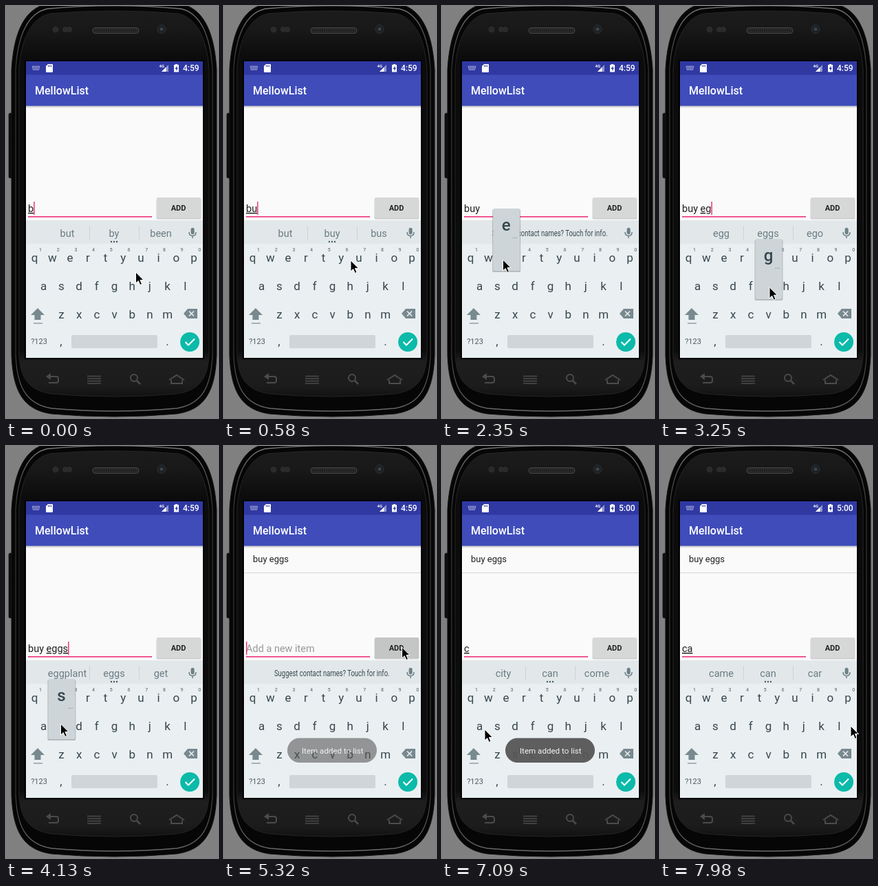
An HTML page for the animation above (8000 ms loop, 308 by 596 pixels).

```html
<!DOCTYPE html>
<html lang="en">
<head>
<meta charset="utf-8">
<title>Todo app on a phone</title>
<style>
html, body { margin: 0; width: 100%; height: 100%; overflow: hidden; background: #808080; }
svg { display: block; width: 308px; height: 596px; }
text { font-family: Roboto, sans-serif; white-space: pre; }
.mid { text-anchor: middle; }
.key { font-size: 17px; fill: #37474f; }
.digit { font-size: 7px; font-weight: 500; fill: #6b7b82; }
.hint { font-size: 14.5px; fill: #6b7b82; }
</style>
</head>
<body>
<svg viewBox="0 0 308 596">
  <defs>
    <linearGradient id="face" x2="0" y2="1">
      <stop offset="0" stop-color="#1c1c1c"/><stop offset=".05" stop-color="#181818"/>
      <stop offset=".12" stop-color="#0c0c0c"/><stop offset=".88" stop-color="#0c0c0c"/>
      <stop offset=".91" stop-color="#1e1e1e"/><stop offset=".97" stop-color="#1c1c1c"/>
      <stop offset="1" stop-color="#121212"/>
    </linearGradient>
    <linearGradient id="rim" x2="0" y2="1">
      <stop offset="0" stop-color="#777"/><stop offset=".15" stop-color="#333"/>
      <stop offset=".85" stop-color="#333"/><stop offset="1" stop-color="#6a6a6a"/>
    </linearGradient>
    <linearGradient id="drop" x2="0" y2="1">
      <stop offset="0" stop-opacity=".25"/><stop offset="1" stop-opacity="0"/>
    </linearGradient>
    <pattern id="mesh" width="3" height="3" patternUnits="userSpaceOnUse">
      <path fill="#1b1b1b" d="M0 0h3v3H0z"/><path fill="#4a4a4a" d="M0 0h1v1H0zM1.5 1.5h1v1h-1z"/>
    </pattern>
  </defs>

  <!-- phone -->
  <rect width="308" height="596" fill="#808080"/>
  <rect x="4" y="155" width="7" height="94" rx="2" fill="#0c0c0c" stroke="#222" stroke-width=".7"/>
  <path fill="#060606" stroke="#151515" d="M56-2C26 6 11 40 8 92V505C10 556 24 584 66 590Q157 598 248 590C290 584 304 556 306 505V92C303 40 288 6 258-2Z"/>
  <path fill="none" stroke="url(#rim)" stroke-width="1.300" d="M60 4C32 10 17 42 14 92V505C16 552 30 576 66 582Q157 590 248 582C284 576 298 552 300 505V92C297 42 282 10 254 4Q157-5 60 4Z"/>
  <path fill="url(#face)" stroke="#242424" d="M64 11C38 16 22 46 19 92V505C21 540 34 556 66 561Q157 569 248 561C280 556 293 540 295 505V92C292 46 276 16 250 11Q157 3 64 11Z"/>
  <rect x="126" y="31.500" width="67" height="8" rx="4" fill="url(#mesh)" stroke="#4a4a4a"/>
  <g fill="#2b2b2b"><circle cx="72" cy="34" r="4.500"/><circle cx="86" cy="34" r="4"/><circle cx="92" cy="34" r="4"/></g>
  <circle cx="226" cy="33.500" r="6" fill="#1c2023" stroke="#303336"/><circle cx="226" cy="33.500" r="2.500" fill="#38444c"/>
  <g fill="none" stroke="#4b4b4b" stroke-width="2">
    <path d="M64 536H73Q76 536 76 539V542Q76 545 73 545H62"/><path fill="#4b4b4b" stroke="none" d="M65 531V541L58 536Z"/>
    <path d="M118 535.500H138M118 539H138M118 542.500H138M118 546H138" stroke-width="1.500"/>
    <circle cx="186" cy="538" r="5"/><path d="M190 542L195 547" stroke-width="2.500"/>
    <path d="M237 541L248 534 259 541M240 541V546H256V541"/>
  </g>
  <rect x="27" y="78" width="261" height="433" fill="#000"/>

  <!-- app -->
  <rect x="29" y="80" width="257" height="429" fill="#fafafa"/>
  <rect x="29" y="144" width="257" height="4" fill="url(#drop)"/>
  <rect x="29" y="99" width="257" height="45.500" fill="#3f4cba"/>
  <rect x="29" y="80" width="257" height="19.500" fill="#3039a2"/>
  <path fill="none" stroke="#c9cde9" stroke-width="1.300" stroke-dasharray="1.300 .7" d="M38 87.500H49M38 89.700H49M39 92H48"/>
  <path fill="#fff" d="M61 84H67Q68 84 68 85V95Q68 96 67 96H59Q58 96 58 95V87Z"/>
  <path stroke="#3039a2" d="M61.500 85.500V88M63.500 85.500V88M65.500 85.500V88"/>
  <text x="222.500" y="89" font-size="6" font-weight="700" fill="#fff">4G</text>
  <path fill="#8e94cf" d="M236 85V95H226Z"/><path fill="#fff" d="M232.500 88.500V95H226Z"/>
  <path fill="#fff" d="M246 84H249V85H251V95.500H244V85H246Z"/><path fill="#3039a2" d="M248.500 86.500L245.500 91H247.300V94L250 89.500H248.300Z"/>
  <text id="clock" x="257" y="94" font-size="12" font-weight="500" fill="#fff"></text>
  <text x="42" y="128" font-size="16" font-weight="500" fill="#fff">MellowList</text>
  <g id="item">
    <text x="42" y="168" font-size="13" fill="#212121">buy eggs</text>
    <path stroke="#d8d8d8" d="M29 183.500H286"/>
  </g>
  <text id="empty" x="32" y="298" font-size="14.500" fill="#999">Add a new item</text>
  <text id="field" x="32" y="298" font-size="14.500" fill="#212121"><tspan id="done"></tspan><tspan id="word" text-decoration="underline"></tspan></text>
  <rect x="32" y="304" width="180" height="1.700" fill="#ee3d83"/>
  <rect id="caret" y="283" width="1.500" height="19" fill="#f0347d"/>
  <rect x="218.500" y="278" width="65" height="30.500" rx="2" fill="#000" opacity=".18"/>
  <rect id="add" x="219" y="277" width="64" height="30" rx="2"/>
  <text class="mid" x="250.500" y="296" font-size="11" font-weight="700" fill="#202020">ADD</text>

  <!-- keyboard -->
  <rect x="29" y="310" width="257" height="199" fill="#eaeff1"/>
  <rect x="29" y="310" width="257" height="34" fill="#e2e8ea"/>
  <g id="hints">
    <path stroke="#cbd3d6" d="M121.500 318V338M193.500 318V338"/>
    <g fill="#455a64"><circle cx="153" cy="341" r="1.200"/><circle cx="157" cy="341" r="1.200"/><circle cx="161" cy="341" r="1.200"/></g>
  </g>
  <text id="ask" transform="translate(73 333) scale(.79 1)" font-size="12" fill="#37474f">Suggest contact names? Touch for info.</text>
  <g fill="none" stroke="#6f8088" stroke-width="1.500">
    <rect x="269.300" y="321.500" width="3.600" height="8" rx="1.800" fill="#6f8088"/>
    <path d="M266 327Q266 332.500 271 332.500T276 327M271 332.500V336"/>
  </g>
  <g id="keys"></g>
  <path fill="#78898f" d="M46 437L56 447H50.500V454H41.500V447H36Z"/>
  <path stroke="#90a0a6" stroke-width="1.500" d="M40 459H53"/>
  <path fill="#78898f" d="M264 438H278V452H264L258 445Z"/>
  <path stroke="#eaeff1" stroke-width="1.600" d="M266 441.500L273 448.500M273 441.500L266 448.500"/>
  <text class="mid" x="48" y="489" font-size="11" fill="#4b5c64">?123</text>
  <rect id="space" x="95" y="476" width="125" height="19" rx="2"/>
  <circle cx="267" cy="486" r="14" fill="#0bbaa9"/>
  <path fill="none" stroke="#fff" stroke-width="2" d="M260.500 486L265 490.500 274 481.500"/>

  <g id="pop">
    <rect id="popShade" width="41" rx="2" opacity=".22"/>
    <rect id="popBox" width="39" rx="2" fill="#cdd5d8"/>
    <text id="popKey" class="mid" font-size="24" font-weight="500" fill="#37474f"></text>
    <text id="popDots" class="mid" font-size="12" fill="#84949a">…</text>
  </g>
  <g id="toast">
    <rect x="92" y="422.500" width="130" height="35.500" rx="17.700" fill="#565656" opacity=".94"/>
    <text class="mid" x="157.800" y="445" font-size="11.600" fill="#f4f4f4">Item added to list</text>
  </g>
  <path id="mouse" fill="#000" stroke="#fff" stroke-linejoin="round" d="M0 0V16L3.700 12.600 6.400 18.500 9 17.300 6.400 11.600H11.500Z"/>
</svg>
<script>
const LOOP = 8000, STEP = 147.8;
const $ = id => document.getElementById(id);
const set = (el, attrs) => { for (const k in attrs) el.setAttribute(k, attrs[k]); };
const show = (id, on) => set($(id), { visibility: on ? 'visible' : 'hidden' });

function label(parent, cls, x, y, str) {
  const el = document.createElementNS('http://www.w3.org/2000/svg', 'text');
  set(el, { class: cls + ' mid', x, y });
  el.textContent = str;
  parent.append(el);
  return el;
}

const rows = [
  { keys: 'qwertyuiop', x: 41.7, y: 370, top: 293, bottom: 383 },
  { keys: 'asdfghjkl', x: 54.7, y: 411, top: 337, bottom: 424 },
  { keys: 'zxcvbnm', x: 80.5, y: 452, top: 377, bottom: 466 }
];
const keyAt = {};
rows.forEach((row, r) => [...row.keys].forEach((ch, i) => {
  const x = row.x + i * 25.7;
  keyAt[ch] = { x, row };
  label($('keys'), 'key', x, row.y, ch);
  if (!r) label($('keys'), 'digit', x + 8.3, 355, (i + 1) % 10);
}));
label($('keys'), 'key', 80, 491, ',');
label($('keys'), 'key', 234.5, 491, '.');
const hints = [89, 157, 225].map(x => label($('hints'), 'hint', x, 334, ''));

// step, text in the field, suggestions
const typed = [
  [0, 'b', 'but by been'], [3, 'bu', 'but buy bus'], [6, 'buy', 'by but guy'],
  [10, 'buy ', ''], [17, 'buy e', 'each even else'], [21, 'buy eg', 'egg eggs ego'],
  [23, 'buy egg', 'eggs egg get'], [28, 'buy eggs', 'eggplant eggs get'],
  [34, '', ''], [44, 'c', 'city can come'], [50, 'ca', 'came can car']
];
// key, first and last step of its popup
const presses = [['u', 2, 3], ['y', 5, 6], ['e', 16, 17], ['g', 20, 21],
  ['g', 22, 23], ['s', 27, 28], ['c', 43, 44], ['a', 49, 50]];
// step, x, y of the pointer
const path = [
  [0, 188.5, 385], [2, 197, 369], [3, 197, 368], [5, 171, 368], [6, 171, 369],
  [8, 173, 496], [11, 172, 494], [15, 90, 370], [16, 88.5, 367], [17, 89, 367],
  [20, 159, 406], [23, 159, 407], [24, 152, 407], [27, 80, 403], [28, 79.5, 402],
  [31, 278, 306], [33, 259, 292], [36, 258.5, 291], [39, 142, 464], [40, 132, 468],
  [42, 131, 452], [44, 131, 450], [48, 62, 410], [50, 58, 406], [53, 288, 411], [54, 277, 405]
];

const clamp = v => Math.max(0, Math.min(1, v));

function pointer(s) {
  const i = path.findIndex(p => p[0] >= s);
  if (i < 1) return path[i < 0 ? path.length - 1 : 0].slice(1);
  const [a, b] = [path[i - 1], path[i]];
  const u = (s - a[0]) / (b[0] - a[0]), e = u * u * (3 - 2 * u);
  return [a[1] + (b[1] - a[1]) * e, a[2] + (b[2] - a[2]) * e];
}

function popup(s) {
  const hit = presses.find(p => s >= p[1] && s <= p[2]);
  show('pop', hit);
  if (!hit) return;
  const { x, row: { top, bottom } } = keyAt[hit[0]];
  const height = bottom - top;
  set($('popShade'), { x: x - 20, y: top + 1, height: height + 1 });
  set($('popBox'), { x: x - 19, y: top, height });
  set($('popKey'), { x, y: top + 32 });
  set($('popDots'), { x: x + 13, y: top + 43 });
  $('popKey').textContent = hit[0];
}

function render(t) {
  const s = Math.floor(t / STEP + 0.12);
  const [since, text, words] = typed.filter(e => e[0] <= s).pop();
  const cut = text.lastIndexOf(' ') + 1;
  $('done').textContent = text.slice(0, cut);
  $('word').textContent = text.slice(cut);
  show('empty', !text);
  show('caret', (s - since) * STEP % 1000 < 500);
  set($('caret'), { x: 32 + (text ? $('field').getComputedTextLength() : 0) });

  show('hints', words);
  show('ask', !words);
  words.split(' ').forEach((w, i) => { hints[i].textContent = w; });

  $('clock').textContent = s < 42 ? '4:59' : '5:00';
  show('item', s >= 34);
  set($('add'), { fill: s >= 33 && s <= 36 ? '#c4c5c5' : '#d6d7d7' });
  set($('space'), { fill: s === 9 || s === 10 ? '#b4bec3' : '#cfd5d8' });
  set($('toast'), { opacity: Math.min(clamp((s - 34) / 3.2), clamp((52 - s) / 4)) });
  popup(s);
  set($('mouse'), { transform: `translate(${pointer(s)})` });
}

const start = performance.now();
(function tick() {
  render((performance.now() - start) % LOOP);
  requestAnimationFrame(tick);
})();
</script>
</body>
</html>
```
